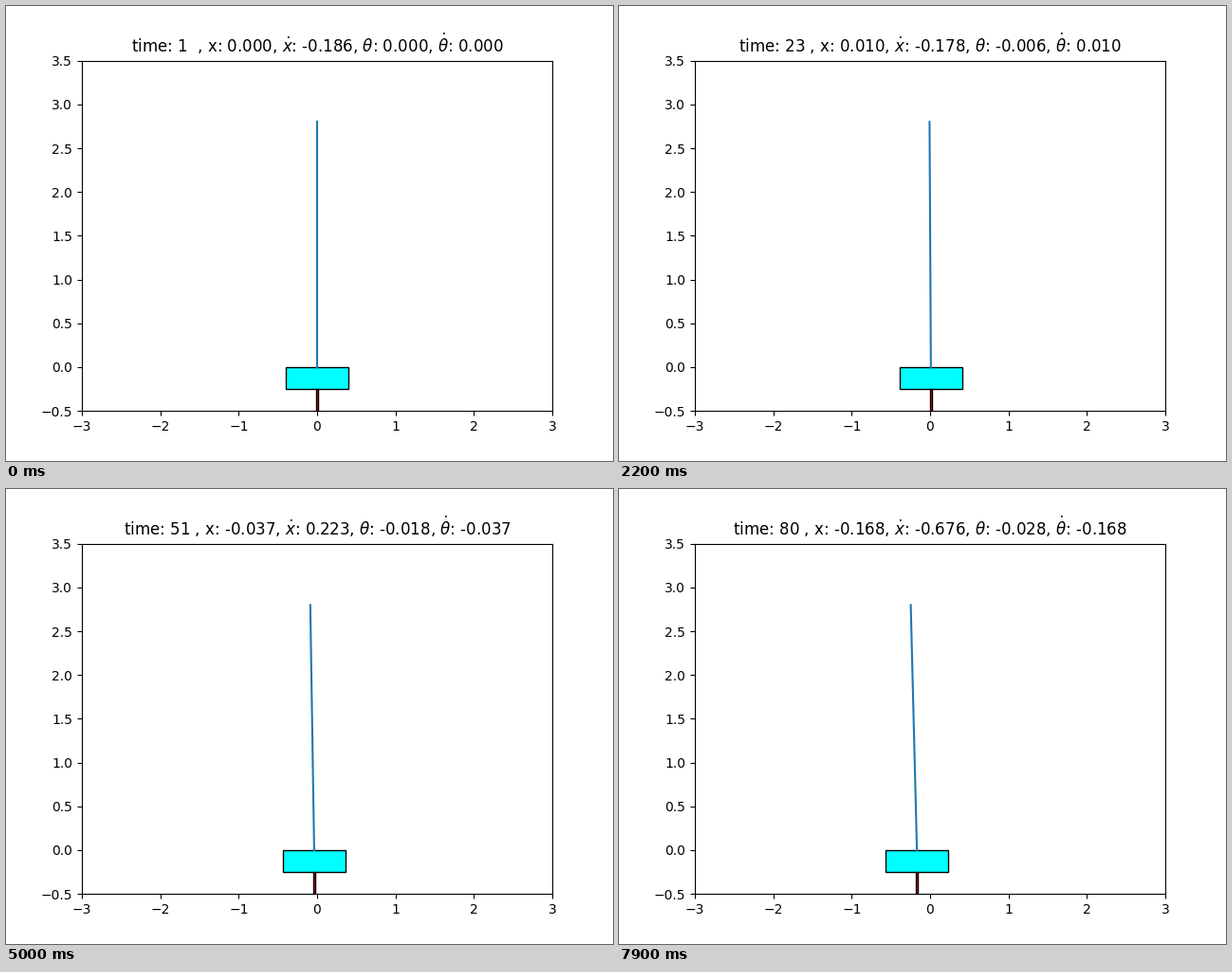
Write a matplotlib script that moves like this. It is 640 by 480 pixels and loops after 8 s.

```python
import math

import matplotlib.pyplot as plt
from matplotlib.animation import FuncAnimation
from matplotlib.patches import Rectangle

FRAMES, INTERVAL = 80, 100

# Cart-pole physics
GRAVITY, FORCE, DT = 9.8, 10.0, 0.02
CART_MASS, POLE_MASS, HALF_LEN = 1.0, 0.3, 0.7
MASS = CART_MASS + POLE_MASS
POLE_ML = POLE_MASS * HALF_LEN

# Controller bands
SMALL_TILT, FAST_CART, FAST_TILT = 0.0168, 0.5, 0.8727

# Drawing sizes, in axis units
CART_W, CART_H, POST_W, POLE_LEN = 0.8, 0.25, 0.02, 2.8


def push_right(v, theta, omega):
    """Bang-bang controller: True pushes right, False pushes left."""
    if omega < -FAST_TILT:
        return False
    if theta >= 0:
        return theta >= SMALL_TILT or abs(v) > FAST_CART
    if abs(v) > FAST_CART:
        return v < 0
    return theta > -SMALL_TILT


def step(state):
    x, v, theta, omega = state
    force = FORCE if push_right(v, theta, omega) else -FORCE
    sin, cos = math.sin(theta), math.cos(theta)
    temp = (force + POLE_ML * omega ** 2 * sin) / MASS
    alpha = (GRAVITY * sin - cos * temp) / (
        HALF_LEN * (4 / 3 - POLE_MASS * cos ** 2 / MASS))
    accel = temp - POLE_ML * alpha * cos / MASS
    return (x + DT * v, v + DT * accel, theta + DT * omega, omega + DT * alpha)


def simulate(n):
    states = [(0.0, 0.0, 0.0, 0.0)]
    for _ in range(n):
        states.append(step(states[-1]))
    return states[1:]


states = simulate(FRAMES)

fig, ax = plt.subplots(figsize=(6.4, 4.8), dpi=100)
ax.set_xlim(-3, 3)
ax.set_ylim(-0.5, 3.5)

cart = ax.add_patch(Rectangle((0, -CART_H), CART_W, CART_H,
                              facecolor="cyan", edgecolor="black"))
post = ax.add_patch(Rectangle((0, -0.5), POST_W, 0.5 - CART_H,
                              facecolor="red", edgecolor="black"))
pole, = ax.plot([], [])
title = ax.set_title("")


def draw(i):
    x, v, theta, _ = states[i]
    cart.set_x(x - CART_W / 2)
    post.set_x(x - POST_W / 2)
    pole.set_data([x, x + POLE_LEN * math.sin(theta)],
                  [0, POLE_LEN * math.cos(theta)])
    # The last field repeats the cart position
    title.set_text(f"time: {i + 1:<3}, x: {x:.3f}, $\\dot{{x}}$: {v:.3f}, "
                   f"$\\theta$: {theta:.3f}, $\\dot{{\\theta}}$: {x:.3f}")
    return cart, post, pole, title


anim = FuncAnimation(fig, draw, frames=FRAMES, interval=INTERVAL,
                     repeat=True, repeat_delay=0, blit=False)
plt.show()
```
